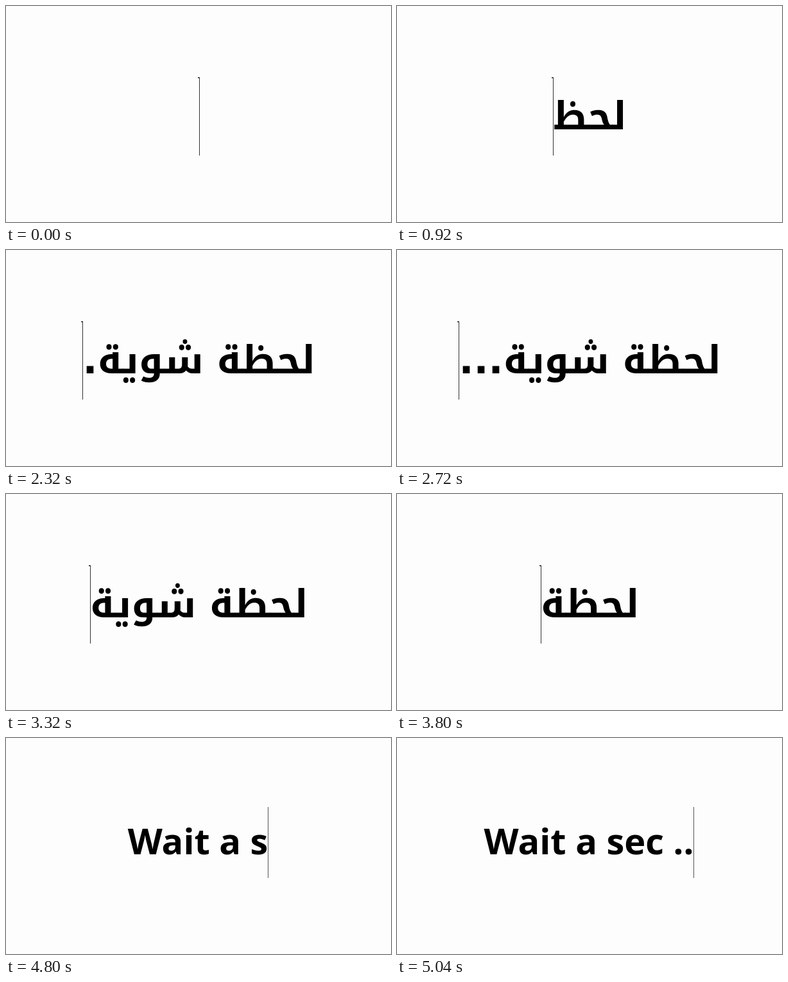
Write an HTML page that moves like this. It is 600 by 338 pixels and loops after 5.08 s.

```html
<!DOCTYPE html>
<html lang="ar">
<head>
<meta charset="utf-8">
<title>لحظة شوية...</title>
<style>
  html, body { margin: 0; width: 100%; height: 100%; overflow: hidden; background: #fdfdfe; }
  svg { display: block; width: 600px; height: 338px; }
</style>
</head>
<body>
<svg viewBox="0 0 600 338" xmlns="http://www.w3.org/2000/svg">
  <rect width="600" height="338" fill="#fdfdfe"/>
  <text id="label" text-anchor="middle" fill="#000"></text>
  <g id="caret">
    <rect id="bar" width="1"/>
    <rect id="flag" x="-2" y="111.5" width="3" height="1.5" fill="#222"/>
  </g>
</svg>
<script>
const LOOP = 5080;
const arabic = 'لحظة شوية...';
const english = 'Wait a sec ..';

const $ = id => document.getElementById(id);
const label = $('label'), caret = $('caret'), bar = $('bar'), flag = $('flag');
const ctx = document.createElement('canvas').getContext('2d');

// A style's font size is chosen so that its whole phrase has the given length.
function makeStyle(style) {
  const font = size => `900 ${size}px ${style.family}`;
  ctx.font = font(100);
  style.size = 100 * style.length / ctx.measureText(style.phrase).width;
  style.measure = text => {
    ctx.font = font(style.size);
    return ctx.measureText(text).width;
  };
  return style;
}

const rtl = makeStyle({
  phrase: arabic, length: 409, family: '"Noto Kufi Arabic", "DejaVu Sans", sans-serif',
  dir: 'rtl', side: -1, center: 301, baseline: 193, top: 112, height: 122, color: '#333'
});
const ltr = makeStyle({
  phrase: english, length: 327, family: '"Noto Sans", "Open Sans", sans-serif',
  dir: 'ltr', side: 1, center: 299, baseline: 182, top: 108, height: 111, color: '#555'
});

const steps = [];
const add = (style, time, text, on = true) => steps.push({ style, time, text, on });
const ar = (time, n, on) => add(rtl, time, arabic.slice(0, n), on);
const en = (time, n) => add(ltr, time, english.slice(0, n));

// Typing, with a short caret blink after each pause
ar(0, 0);
ar(200, 0, false);
[320, 640, 920, 1120].forEach((time, i) => ar(time, i + 1));
ar(1320, 4, false);
[1400, 1560, 1640, 1880, 2080, 2320, 2520, 2720].forEach((time, i) => ar(time, i + 5));
ar(3040, 12, false);

// Deleting
ar(3160, 11);
ar(3320, 9);
[3480, 3560, 3640, 3720, 3800, 3920, 4040, 4160, 4320].forEach((time, i) => ar(time, 8 - i));

// The second phrase starts in lower case
en(4360, 0);
[4440, 4480, 4520, 4560].forEach((time, i) => add(ltr, time, 'wait'.slice(0, i + 1)));
[4600, 4640, 4680, 4720, 4760, 4840, 4880, 4920, 5000, 5040]
  .forEach((time, i) => en(time, i + 4));

let shown = null;

function draw(time) {
  const step = steps.filter(s => s.time <= time).pop();
  if (step === shown) return;
  shown = step;

  const { style, text, on } = step;
  const word = text.trimEnd();
  label.setAttribute('x', style.center);
  label.setAttribute('y', style.baseline);
  label.setAttribute('direction', style.dir);
  label.style.fontFamily = style.family;
  label.style.fontSize = style.size + 'px';
  label.style.fontWeight = 900;
  label.textContent = word;

  // A trailing space moves the caret only.
  const gap = word === text ? 0 : style.measure(' ');
  const edge = style.center + style.side * (style.measure(word) / 2 + gap);
  const x = Math.round(edge - 0.5);
  caret.setAttribute('transform', `translate(${x} 0)`);
  caret.setAttribute('visibility', on ? 'visible' : 'hidden');
  bar.setAttribute('y', style.top);
  bar.setAttribute('height', style.height);
  bar.setAttribute('fill', style.color);
  flag.setAttribute('display', style === rtl ? 'inline' : 'none');
}

const start = performance.now();
function tick() {
  draw((performance.now() - start) % LOOP);
  requestAnimationFrame(tick);
}
tick();
</script>
</body>
</html>
```
